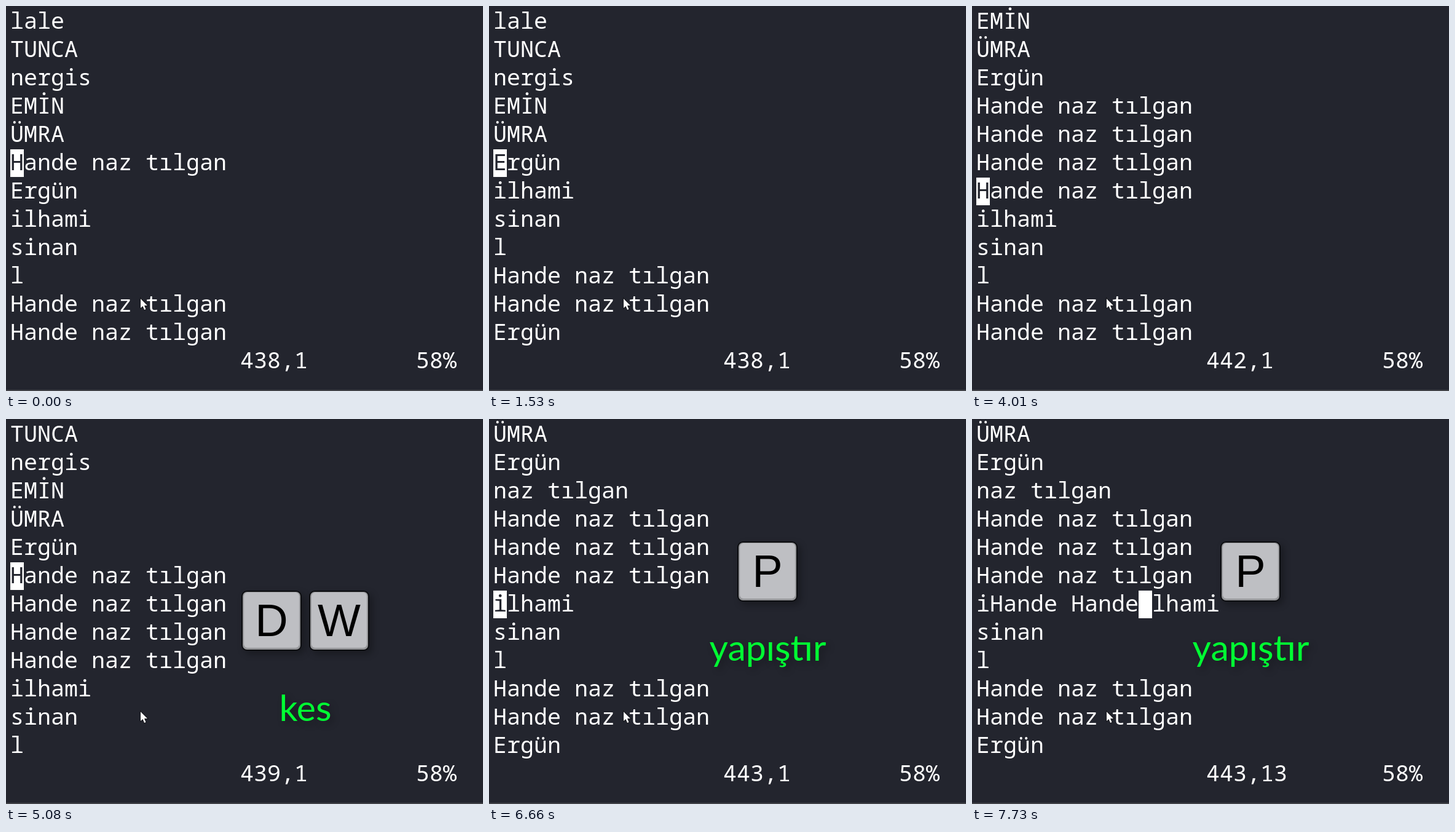
Animation of 776 by 626 pixels, one loop 8000 ms. Source, as an HTML page with a canvas:

```html
<!DOCTYPE html>
<html lang="tr">
<head>
<meta charset="utf-8">
<title>Terminal</title>
<style>
html, body { margin: 0; width: 100%; height: 100%; overflow: hidden; background: #23252e; }
canvas { display: block; }
</style>
</head>
<body>
<canvas id="stage" width="776" height="626"></canvas>
<script>
const ctx = document.getElementById('stage').getContext('2d');
const LOOP = 8000, LEFT = 7, TOP = 3, CELL = 22, ROW = 46, ROWS = 12, FIRST = 433;
const BG = '#23252e', FG = '#ffffff', GREEN = '#00ff33';
const MONO = '36.667px "Noto Sans Mono", "DejaVu Sans Mono", monospace';
const WORD = 'Hande ', REST = 'naz tılgan', FULL = WORD + REST;

// Editor states: start time, lines, first visible line, cursor line and column.
const states = [];
let lines = ['lale', 'TUNCA', 'nergis', 'EMİN', 'ÜMRA', FULL, 'Ergün',
  'ilhami', 'sinan', 'l', FULL, FULL, 'Ergün'];
let head = 0, line = 5, col = 0;

function save(at) {
  states.push({ at, lines: [...lines], head, line, col });
}
function moveTo(target) {
  line = target;
  head = Math.max(0, Math.min(head, line - 5), line - 6);
}
function pasteLine(at) {
  lines.splice(line + 1, 0, FULL);
  moveTo(line + 1);
  save(at);
}
function pasteWord(at) {
  const s = lines[line];
  lines[line] = s.slice(0, col + 1) + WORD + s.slice(col + 1);
  col += WORD.length;
  save(at);
}

save(0);
lines.splice(line, 1);
save(470);
[2200, 2400, 3270, 4010].forEach(pasteLine);
moveTo(6);
save(4950);
lines[line] = REST;
save(5280);
moveTo(10);
save(6470);
[6960, 7730].forEach(pasteWord);

function mono(text, x, row, color = FG) {
  ctx.font = MONO;
  ctx.textAlign = 'left';
  ctx.fillStyle = color;
  ctx.fillText(text, x, TOP + row * ROW + 34);
}

function drawEditor(s) {
  for (let r = 0; r < ROWS; r++) mono(s.lines[s.head + r] || '', LEFT, r);
  const row = s.line - s.head, x = LEFT + s.col * CELL;
  ctx.fillStyle = FG;
  ctx.fillRect(x, TOP + row * ROW, CELL, 45);
  mono(s.lines[s.line][s.col], x, row, BG);
  mono(`${FIRST + s.line},${s.col + 1}`, LEFT + 17 * CELL, ROWS);
  mono('58%', LEFT + 30 * CELL, ROWS);
}

function shadow(on) {
  ctx.shadowColor = on ? 'rgba(0,0,0,0.3)' : 'transparent';
  ctx.shadowBlur = on ? 12 : 0;
  ctx.shadowOffsetX = ctx.shadowOffsetY = on ? 5 : 0;
}

function box(x, y, w, h, r, fill) {
  ctx.beginPath();
  ctx.roundRect(x, y, w, h, r);
  ctx.fillStyle = fill;
  ctx.fill();
}

function key(letter, x, y) {
  shadow(true);
  box(x, y, 98, 98, 9, '#0c0d10');
  shadow(false);
  box(x + 2, y + 2, 94, 94, 7, '#96979a');
  box(x + 4, y + 3, 90, 90, 6, '#bebfc3');
  ctx.font = '74px "Liberation Sans", Arial, sans-serif';
  ctx.textAlign = 'center';
  ctx.fillStyle = '#000';
  ctx.fillText(letter, x + 49, y + 74);
}

function label(text, x, y, align = 'center') {
  shadow(true);
  ctx.font = '59px Lato, "Open Sans", sans-serif';
  ctx.textAlign = align;
  ctx.fillStyle = GREEN;
  ctx.fillText(text, x, y);
  shadow(false);
}

function cutLine() {
  key('D', 237, 293);
  key('D', 347, 293);
  label('satır kes', 458, 361, 'left');
}
function cutWord() {
  key('D', 383, 279);
  key('W', 493, 279);
  label('kes', 487, 491);
}
function paste() {
  key('P', 404, 199);
  label('yapıştır', 453.5, 393);
}

const hints = [
  [330, 1530, cutLine],
  [2130, 4010, paste],
  [4950, 6140, cutWord],
  [6660, 7200, paste],
  [7530, LOOP, paste]
];

function pointer(x, y) {
  const pts = [[0, 0], [0, 15], [3.5, 12], [6, 18], [8.5, 17], [6, 11], [11, 11]];
  ctx.beginPath();
  pts.forEach(([dx, dy]) => ctx.lineTo(x + dx, y + dy));
  ctx.closePath();
  ctx.lineWidth = 2;
  ctx.strokeStyle = '#15161b';
  ctx.stroke();
  ctx.fillStyle = FG;
  ctx.fill();
}

function draw(now) {
  const t = now % LOOP;
  ctx.fillStyle = BG;
  ctx.fillRect(0, 0, 776, 626);
  ctx.fillStyle = '#414247';
  ctx.fillRect(0, 624, 776, 2);
  drawEditor(states.findLast(s => s.at <= t));
  for (const [from, to, show] of hints) if (t >= from && t < to) show();
  pointer(219, 476);
}

let start;
function tick(now) {
  start ??= now;
  draw(now - start);
  requestAnimationFrame(tick);
}
draw(0);
requestAnimationFrame(tick);
</script>
</body>
</html>
```
